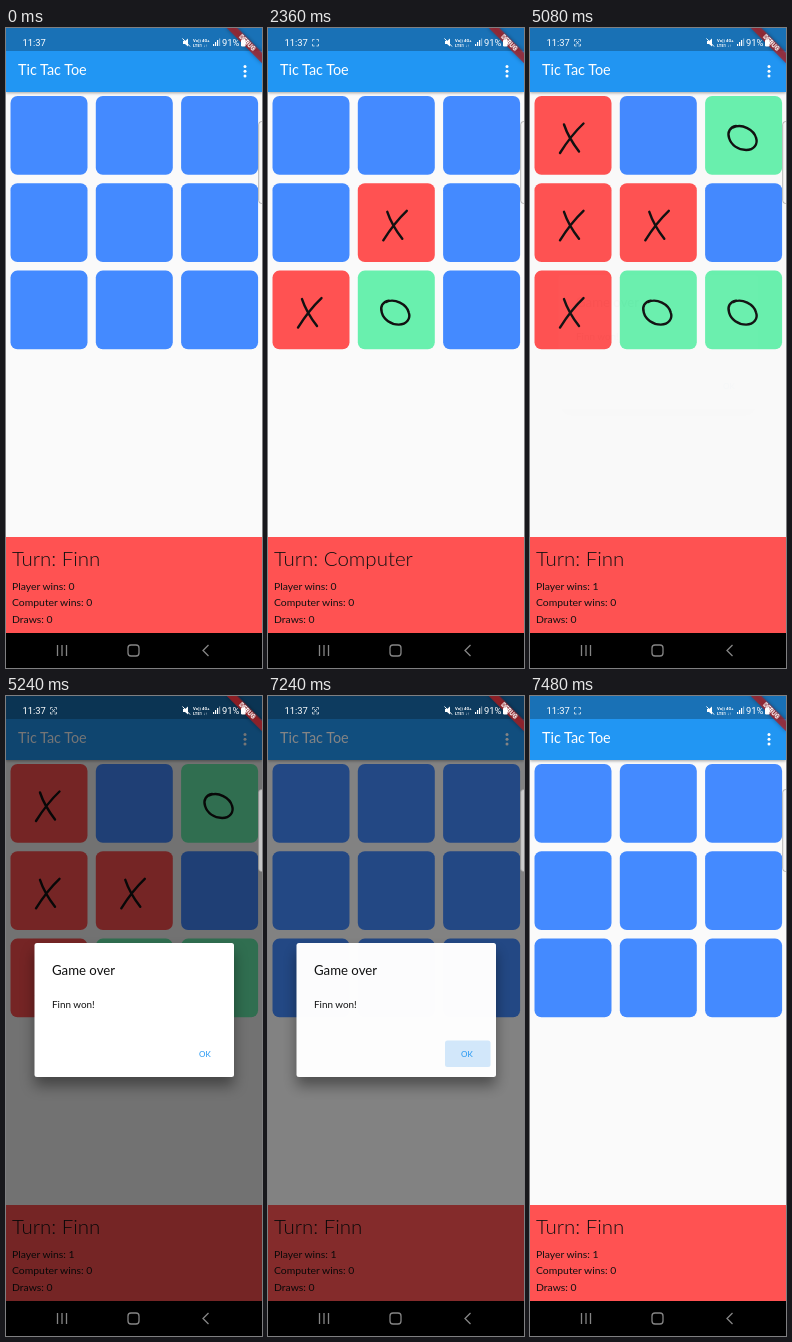
An HTML page for the animation above (7.72 s loop, 256 px wide and 640 px high).

```html
<!DOCTYPE html>
<html lang="en">
<head>
<meta charset="utf-8">
<title>Tic Tac Toe</title>
<style>
  html, body { margin: 0; width: 100%; height: 100%; overflow: hidden; background: #fafafa; }
  svg { display: block; width: 100%; height: 100%; font-family: Lato, sans-serif; }
  .status { font: 9.4px Roboto, sans-serif; fill: #fff; }
  .network { font: bold 4.2px Roboto, sans-serif; }
  .small { font-size: 10.4px; }
  .mark { fill: none; stroke: #111; stroke-width: 2.4; stroke-linecap: round; stroke-linejoin: round; }
  .card { filter: drop-shadow(0 9px 7px rgba(0, 0, 0, .4)); }
  .bar { filter: drop-shadow(0 1.5px 1.5px rgba(0, 0, 0, .35)); }
  .ribbon { filter: drop-shadow(0 0 2px rgba(0, 0, 0, .45)); }
</style>
</head>
<body>
<svg viewBox="0 0 256 640">
  <rect width="256" height="640" fill="#fafafa"/>
  <g id="board"></g>

  <rect class="bar" width="256" height="64" fill="#2196f3"/>
  <rect width="256" height="23" fill="#1971b6"/>
  <text x="12" y="47" font-size="14.4" fill="#fff">Tic Tac Toe</text>
  <g fill="#fff">
    <circle cx="239" cy="38.6" r="1.5"/><circle cx="239" cy="43.3" r="1.5"/><circle cx="239" cy="48" r="1.5"/>
  </g>

  <rect y="509" width="256" height="96" fill="#ff5252"/>
  <g fill="#111">
    <text id="turn" x="6" y="538" font-size="20.5" font-weight="300"></text>
    <text id="wins" class="small" x="6" y="561.5"></text>
    <text class="small" x="6" y="578">Computer wins: 0</text>
    <text class="small" x="6" y="594.5">Draws: 0</text>
  </g>

  <rect id="barrier" width="256" height="605"/>
  <g id="dialog">
    <rect class="card" x="28.5" y="247" width="199.5" height="134" rx="2.5" fill="#fff"/>
    <rect id="press" x="177" y="344.5" width="45.5" height="26.5" rx="2.5" fill="#d3e9fc"/>
    <text x="46" y="278.5" font-size="13.2" fill="#111">Game over</text>
    <text x="46" y="312" font-size="9.9" fill="#111">Finn won!</text>
    <text x="193" y="361" font-size="8" fill="#2196f3">OK</text>
  </g>

  <g class="ribbon" transform="translate(256 0) rotate(45)">
    <rect x="-25" y="17.4" width="50" height="7.5" fill="#b71c1c" fill-opacity=".75"/>
    <text y="23.4" font-family="Roboto, sans-serif" font-size="6.3" font-weight="900" fill="#fff" text-anchor="middle">DEBUG</text>
  </g>
  <rect x="252.7" y="93.5" width="9" height="82" rx="3" fill="#f4f4f4" fill-opacity=".65" stroke="#999" stroke-width=".7"/>

  <g class="status">
    <text x="16.5" y="18">11:37</text>
    <g fill="none" stroke="#fff" stroke-width=".8" opacity=".85">
      <path id="corners" d="M44.5 13.5V11.5H46.5M48.5 11.5H50.5V13.5M50.5 16V18H48.5M46.5 18H44.5V16"/>
      <path id="cross" d="M46 13L49 16.5M49 13L46 16.5"/>
    </g>
    <path d="M177 13H179L182 10.5V18.5L179 16H177Z"/>
    <path d="M176.5 10.5L184 18.5" stroke="#fff"/>
    <text class="network" x="187" y="14">Vo)) 4G+</text>
    <text class="network" x="187" y="18.5">LTE1 ↓↑</text>
    <path d="M207 18V16H208.2V18ZM209 18V14H210.2V18ZM211 18V12H212.2V18Z"/>
    <path d="M213 18V10.5H214.2V18Z" opacity=".45"/>
    <text x="216" y="18">91%</text>
    <rect x="235" y="11.5" width="4.6" height="7" rx="1.2"/>
  </g>

  <rect y="605" width="256" height="35"/>
  <g fill="none" stroke="#858585" stroke-width="1.3">
    <path d="M51.5 617V628M56 617V628M60.5 617V628"/>
    <rect x="122" y="617" width="11" height="11" rx="3"/>
    <path d="M202.5 617L197 622.5L202.5 628"/>
  </g>
</svg>
<script>
const LOOP = 7720, WIN = 5080, PRESS = 7080, RESET = 7210, FADE = 150;
const PLAYER = "Finn";
const COLORS = { "": "#448aff", X: "#ff5252", O: "#69f0ae" };
const GLYPHS = {
  "": "",
  X: "M49 27.5C40 36 33 45 25.5 57M29.5 28.5C32 36 38 47 44.5 55.5",
  O: "M31 30C25 31 22 36 24 42C26 49 33 54 41 54C49 54 53 48 51 42C49 34 37 27 28 31.5"
};
// Cells count from the top left, row by row.
const MOVES = [
  { at: 40, cell: 4, mark: "X" }, { at: 800, cell: 7, mark: "O" },
  { at: 2040, cell: 6, mark: "X" }, { at: 2800, cell: 2, mark: "O" },
  { at: 4080, cell: 0, mark: "X" }, { at: 4840, cell: 8, mark: "O" },
  { at: WIN, cell: 3, mark: "X" }
];

const $ = id => document.getElementById(id);
const clamp = v => Math.min(1, Math.max(0, v));

$("board").innerHTML = Array.from({ length: 9 }, (_, i) =>
  `<g transform="translate(${4.5 + i % 3 * 85.3} ${68 + Math.floor(i / 3) * 87.3})">
    <rect width="77" height="78.7" rx="7"/><path class="mark"/></g>`).join("");
const tiles = [...$("board").children];

function draw(t) {
  const played = t < RESET ? MOVES.filter(m => t >= m.at) : [];
  tiles.forEach((tile, i) => {
    const mark = played.find(m => m.cell === i)?.mark ?? "";
    tile.firstElementChild.setAttribute("fill", COLORS[mark]);
    tile.lastElementChild.setAttribute("d", GLYPHS[mark]);
  });

  const computerTurn = t < WIN && played.at(-1)?.mark === "X";
  $("turn").textContent = "Turn: " + (computerTurn ? "Computer" : PLAYER);
  $("wins").textContent = "Player wins: " + (t < WIN ? 0 : 1);

  const shown = clamp((t - WIN) / FADE) * (1 - clamp((t - RESET - 15) / FADE));
  const eased = 1 - (1 - shown) ** 2;
  $("barrier").setAttribute("opacity", .54 * shown);
  $("dialog").setAttribute("opacity", eased);
  $("press").setAttribute("opacity", clamp((t - PRESS) / 100));

  $("corners").setAttribute("opacity", t < 40 ? 0 : 1);
  $("cross").setAttribute("opacity", t >= 3040 && t < 7360 ? 1 : 0);
}

const start = performance.now();
function tick() {
  draw((performance.now() - start) % LOOP);
  requestAnimationFrame(tick);
}
tick();
</script>
</body>
</html>
```
